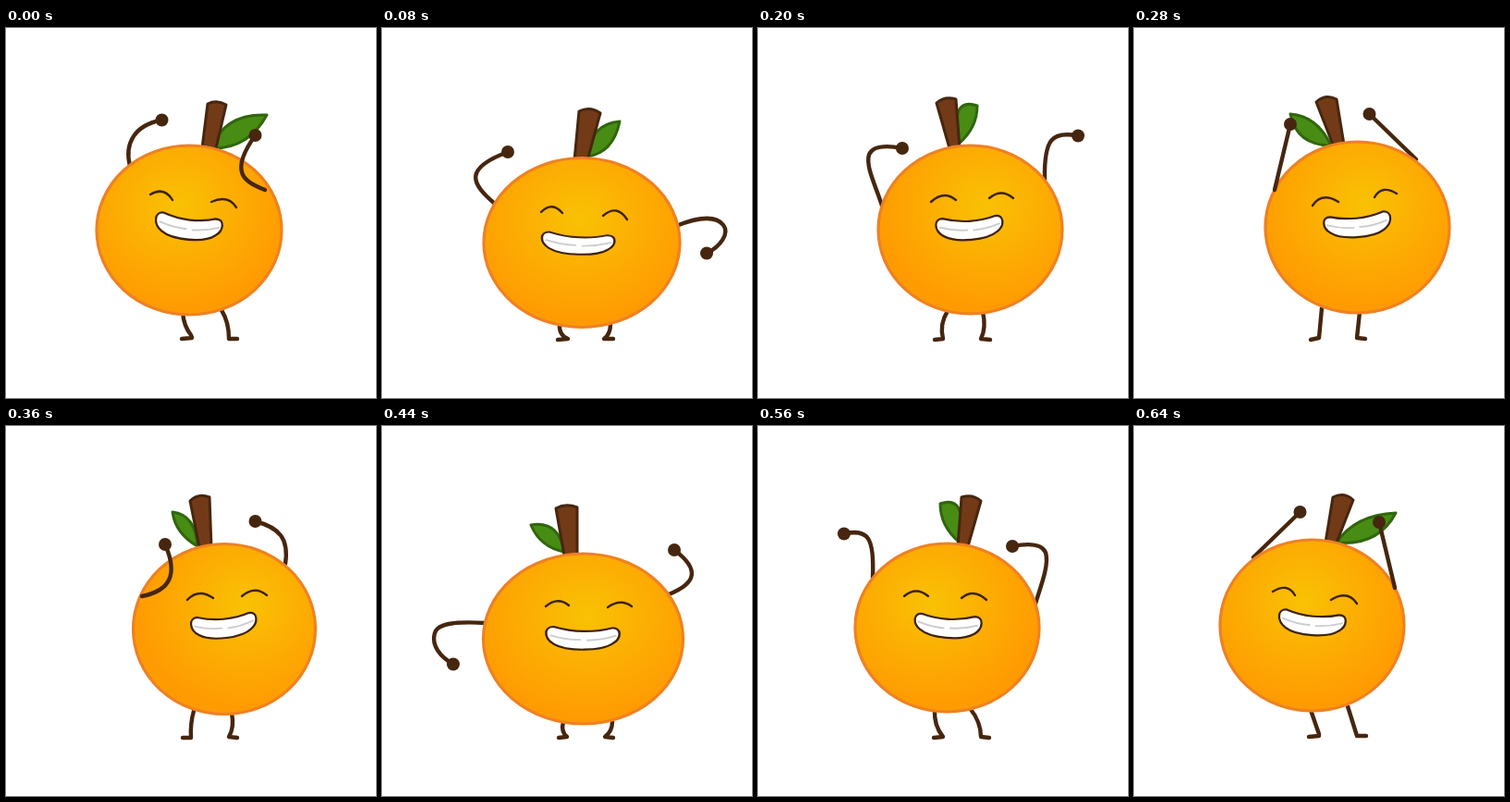
These frames come from a looping animation (400 px wide and 400 px high, 0.72 s). An HTML page:

```html
<!DOCTYPE html>
<html lang="en">
<head>
<meta charset="utf-8">
<title>Dancing orange</title>
<style>
  html, body { margin: 0; width: 100%; height: 100%; overflow: hidden; background: #fff; }
  svg { display: block; width: 100%; height: 100%; }
  .limb { fill: none; stroke: #46260f; stroke-width: 4.4; stroke-linecap: round; stroke-linejoin: round; }
  .hand { fill: #46260f; }
  .leaf { fill: #488c13; stroke: #30660f; stroke-width: 3; stroke-linejoin: round; }
  .stem { fill: #733a17; stroke: #46260f; stroke-width: 3; stroke-linejoin: round; }
  .peel { fill: url(#glow); stroke: #ef8122; stroke-width: 3.2; }
  .eyes { fill: none; stroke: #3d220e; stroke-width: 2.4; stroke-linecap: round; }
  .lips { fill: #fff; stroke: #3d220e; stroke-width: 2.3; }
  .teeth { fill: none; stroke: #cdcdcd; stroke-width: 2; stroke-linecap: round; }
</style>
</head>
<body>
<svg id="stage" viewBox="0 0 400 400" xmlns="http://www.w3.org/2000/svg">
  <defs>
    <radialGradient id="glow" cy=".36" r=".6">
      <stop offset="0" stop-color="#f9c204"/>
      <stop offset=".45" stop-color="#fcb003"/>
      <stop offset="1" stop-color="#ff9b02"/>
    </radialGradient>
  </defs>
  <g id="scene"></g>
</svg>
<script>
const LOOP = 720;
const MIRROR = 'translate(434 0) scale(-1 1)';
const LIPS = 'M-29-11Q-14-6 0-6Q16-6 28-10C38-11 38 2 29 8C18 17-16 18-29 9C-39 2-39-11-29-11Z';
const TEETH = 'M-32-1Q-18 4-3 4M4 4.5Q18 4 32-1';

// body: cx cy rx ry; mouth: x y tilt scaleX scaleY; front: arm drawn over the body
const leanLeft = {
  body: [198, 218.5, 100, 91.5],
  mouth: [198, 213.5, 6, 1, 1],
  eyes: 'M156 180Q171 171 180 186M222 188Q240 180 249 194',
  stem: 'M218 82Q228 77 238 83L227 130L212 130Z',
  leaf: 'M222 130Q236 92 282 94Q262 131 222 130Z',
  arms: ['M134 149C128 126 138 105 168.5 99.5', 'M280 175C262 167 238 160 269.5 116'],
  front: 1,
  legs: 'M191 307Q192 322 200 332L201 335L190 336M233 305Q241 318 241 336L250 336'
};
const squashRight = {
  body: [216, 232, 106, 91.5],
  mouth: [212.5, 231.5, 2.5, 1.09, 0.87],
  eyes: 'M172 199Q184 187 195 200M239 203Q254 190 265 207',
  stem: 'M213 90Q225 84 236 92L222 143L208 143Z',
  leaf: 'M222 139Q225 104 257 101Q250 135 222 139Z',
  arms: ['M122 190C96 168 88 152 136 134', 'M318 214C345 203 362 204 369 213C376 222 366 236 351 243.5'],
  legs: 'M192 320Q191 332 201 336L190 337M247 320Q247 331 240 336L250 336'
};
const riseRight = {
  body: [229.5, 218, 99.5, 91],
  mouth: [229, 214.5, -4, 1, 0.95],
  eyes: 'M187 188Q201 175 214 186M250 184Q263 173 276 184',
  stem: 'M193 81Q202 73 214 77L218 130L207 130Z',
  leaf: 'M217 125Q207 74 237 84Q237 108 217 125Z',
  arms: ['M135 195C128 172 116 150 120 137C124 127 140 127 156 130', 'M310 164C309 120 318 111 346 116.5'],
  legs: 'M205 306Q196 320 200 336L191 337M243 307Q247 324 241 336L251 337'
};
const leanRight = {
  body: [236, 219.5, 98.5, 92],
  mouth: [236, 214.5, -6, 0.98, 0.96],
  eyes: 'M196 188Q208 175 224 186M255 184Q269 172 282 183',
  stem: 'M199 81Q208 72 220 77L222 131L209 131Z',
  leaf: 'M207 130Q205 96 180 93Q183 116 207 130Z',
  arms: ['M147 184C178 178 186 160 172 128', 'M302 149C306 122 296 110 269.5 103'],
  front: 0,
  legs: 'M203 308Q199 322 200 337L191 337M244 310Q247 326 241 336L250 337'
};
const squashLeft = {
  body: [217.5, 230, 108, 92],
  mouth: [217.5, 227.5, 0.5, 1.1, 0.93],
  eyes: 'M177 195Q190 184 202 194M244 196Q258 186 270 195',
  stem: 'M188 89Q199 83 211 88L211 140L197 140Z',
  leaf: 'M197 136Q191 102 161 107Q171 131 197 136Z',
  arms: ['M112 213C80 211 60 213 57 224C53 238 64 250 77 257.5', 'M310 182C340 170 344 155 316 134'],
  legs: 'M196 320Q193 330 200 336L191 337M249 320Q249 330 241 336L250 337'
};
const stretchLeft = {
  body: [192.5, 215.5, 99.5, 92.5],
  mouth: [193, 211.5, 5, 1, 0.96],
  eyes: 'M150 179Q166 169 174 183M213 188Q231 177 241 192',
  stem: 'M215 77Q227 71 237 80L219 126L207 126Z',
  leaf: 'M219 126Q239 96 283 94Q264 130 219 126Z',
  arms: ['M129 142L179.5 93', 'M282 175L265 104'],
  front: 1,
  legs: 'M191 307L200 333L200 335L189 336M231 303L241 335L251 335'
};
const stretchRight = {
  ...stretchLeft, flip: true,
  leaf: 'M221 127Q236 95 265 93Q258 127 221 127Z',
  legs: 'M203 303L200 335L191 337M244 307L241 335L250 336'
};
const riseLeft = {
  ...riseRight, flip: true,
  arms: ['M135 195C128 172 119 150 123 137C127 127 143 127 159 130', 'M310 164C308 120 315 111 341 116.5'],
  legs: 'M191 306Q190 324 200 336L190 337M229 305Q241 320 241 336L250 337'
};

const steps = [
  [0, leanLeft], [80, squashRight], [200, riseRight], [280, stretchRight],
  [360, leanRight], [440, squashLeft], [560, riseLeft], [640, stretchLeft]
];

const path = (cls, d) => `<path class="${cls}" d="${d}"/>`;

function arm(d) {
  const [x, y] = d.match(/[\d.]+/g).slice(-2);
  return path('limb', d) + `<circle class="hand" cx="${x}" cy="${y}" r="7"/>`;
}

function draw(p) {
  const [cx, cy, rx, ry] = p.body;
  const [mx, my, tilt, sx, sy] = p.mouth;
  const back = p.arms.filter((_, i) => i !== p.front).map(arm).join('');
  const front = p.front === undefined ? '' : arm(p.arms[p.front]);
  return path('limb', p.legs) +
    `<g transform="${p.flip ? MIRROR : ''}">` +
    back + path('leaf', p.leaf) + path('stem', p.stem) +
    `<ellipse class="peel" cx="${cx}" cy="${cy}" rx="${rx}" ry="${ry}"/>` +
    path('eyes', p.eyes) +
    `<g transform="translate(${mx} ${my}) rotate(${tilt}) scale(${sx} ${sy})">` +
    path('lips', LIPS) + path('teeth', TEETH) + '</g>' +
    front + '</g>';
}

const scene = document.getElementById('scene');
const glow = document.getElementById('glow');
const start = performance.now();
let shown = null;

function update(now) {
  const t = Math.max(0, now - start) % LOOP;
  const pose = steps.filter(([from]) => from <= t).pop()[1];
  if (pose !== shown) {
    // the highlight follows the lean of the face
    glow.setAttribute('cx', 0.53 - 0.015 * pose.mouth[2]);
    scene.innerHTML = draw(pose);
    shown = pose;
  }
}

function tick(now) {
  update(now);
  requestAnimationFrame(tick);
}

update(start);
requestAnimationFrame(tick);
</script>
</body>
</html>
```
